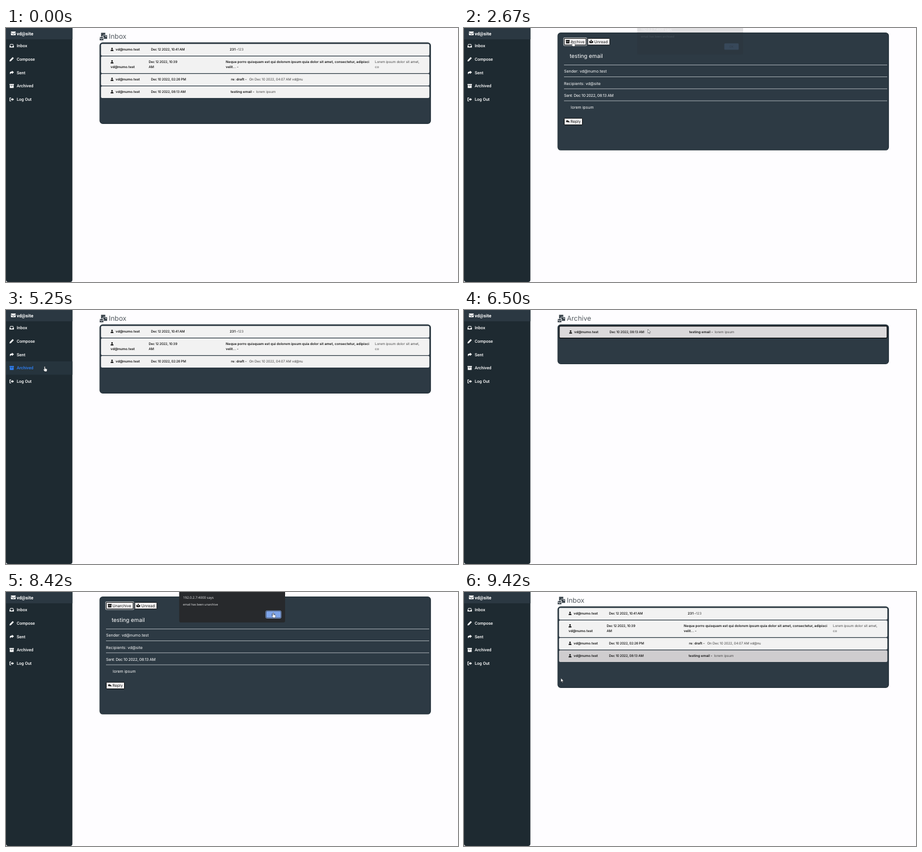
Write an HTML page that moves like this. It is 800 by 450 pixels and loops after 9510 ms.

```html
<!DOCTYPE html>
<html lang="en">
<head>
<meta charset="utf-8">
<title>Mailbox</title>
<style>
  html, body { margin: 0; width: 100%; height: 100%; overflow: hidden; background: #fefdff; }
  svg { display: block; width: 100vw; height: 100vh; }
  text { font-family: Inter, sans-serif; font-size: 6px; fill: #111; white-space: pre; text-rendering: geometricPrecision; }
  .side { font: 500 7.5px Roboto, sans-serif; fill: #fff; }
  .account { font: 700 8.1px Roboto, sans-serif; fill: #fff; }
  .on { fill: #2f80f5; }
  .heading { font-size: 12px; fill: #50575d; }
  .bold { font-weight: 600; letter-spacing: .04px; }
  .date { font-weight: 500; letter-spacing: -.24px; }
  .body { fill: #444; }
  .title { font-size: 9.8px; fill: #fff; }
  .field { font-size: 7px; fill: #fff; }
  .stamp { letter-spacing: -.3px; }
  .button { font-size: 6.9px; }
  .host { font: 6px "Open Sans", sans-serif; fill: #e6e7e9; }
  .note { font: 5.2px "Open Sans", sans-serif; fill: #f3f4f5; }
  .ok { font: 5.2px "Open Sans", sans-serif; fill: #2a3950; text-anchor: middle; }
</style>
</head>
<body>
<svg id="stage" viewBox="0 0 800 450"></svg>
<script>
const LOOP = 9510, STEP = 1000 / 12, LAST = 113;
const USER = "vd@site", SENDER = "vd@numo.test", HOST = "192.0.2.7:4000";

// Icons on a 16 unit grid
const ICONS = {
  mail: "M1 2h14l1 1v1.6l-8 5.6-8-5.6V3zM0 6.4l8 5.6 8-5.6V13l-1 1H1l-1-1z",
  inbox: "M3 2h10l3 7v5H0V9zM4.2 4L2 9h3l1.2 2.2h3.6L11 9h3l-2.2-5z",
  pen: "M11.5.5l4 4L5 15l-5 1 1-5z",
  share: "M9 1l7 6-7 6V9.5Q2.5 9.5 3 15-3 4.5 9 4.5z",
  reply: "M7 1L0 7l7 6V9.5q6.500 0 6 5.500 6-10.500-6-10.500z",
  box: "M0 1h16v4H0zM1 6h14v9H1zM5.500 7.500v1.500h5V7.500z",
  exit: "M6 1.500v2H2.200v9H6v2H1l-1-1v-11l1-1zM10 3l6 5-6 5v-3H5V6h5z",
  user: "M8 0a4 4 0 0 1 0 8 4 4 0 0 1 0-8zM1 16v-2q0-5 5-5h4q5 0 5 5v2z",
  stack: "M3 0h9v4H8L6 6v2H3zM0 9h8v1l-4 2.500L0 10zM0 11.200l4 2.500 4-2.500V16H0zM7 5h9v8H9V8H7zM12.500 6.500v2H14.500v-2z",
  reader: "M0 5q4 0 7.500 2v8Q4 13 0 13zM16 5q-4 0-7.500 2v8q3.500-2 7.500-2zM8 0a2.500 2.500 0 0 1 0 5.200 2.500 2.500 0 0 1 0-5.200z"
};
const MENU = [["inbox", "Inbox"], ["pen", "Compose"], ["share", "Sent"], ["box", "Archived"], ["exit", "Log Out"]];

const MAILS = [
  { date: ["Dec 12 2022, 10:41 AM"], subject: ["231 -"], sx: 396, body: ["123"], bx: 410.6 },
  { date: ["Dec 12 2022, 10:39", "AM"], body: ["Lorem ipsum dolor sit amet,", "co"], sx: 389, bx: 653, wrap: true,
    subject: ["Neque porro quisquam est qui dolorem ipsum quia dolor sit amet, consectetur, adipisci", "velit... -"] },
  { date: ["Dec 10 2022, 02:26 PM"], subject: ["re: draft -"], sx: 398.3, body: ["On Dec 10 2022, 04:07 AM vd@nu"], bx: 430.5, tight: true },
  { date: ["Dec 10 2022, 08:13 AM"], subject: ["testing email -"], sx: 397.5, body: ["lorem ipsum"], bx: 442.6 }
];

// Pages by starting step
const PAGES = [
  { at: 0, head: "Inbox", mails: MAILS },
  { at: 14, action: "Archive", wide: 39.5, focus: 30 },
  { at: 47, head: "Inbox", mails: MAILS.slice(0, 3) },
  { at: 72, head: "Archive", mails: MAILS.slice(3) },
  { at: 81, action: "Unarchive", wide: 48.5, focus: 89 },
  { at: 103, head: "Inbox", mails: MAILS }
];
const DIALOGS = [
  { open: 32, close: 47, note: "email has been archived" },
  { open: 91, close: 103, note: "email has been unarchive" }
];
// Pointer tip: step, x, y
const PATH = [
  [1, 346, 281], [9, 340, 115], [19, 340, 115], [29, 192.500, 23.500], [34, 192.500, 23.500], [42, 480, 38],
  [48, 480, 38], [55, 172, 86], [61, 68.500, 100], [71, 68.500, 100], [78, 325.500, 34], [82, 326, 36],
  [88, 198, 23], [92, 198, 23], [99, 473, 36.500], [104, 473, 36.500], [109, 330, 106], [112, 205, 118], [113, 171.500, 152.500]
];

const text = (cls, x, y, str) => `<text class="${cls}" x="${x}" y="${y}">${str}</text>`;
const rect = (x, y, w, h, fill, r = 0, extra = "") =>
  `<rect x="${x}" y="${y}" width="${w}" height="${h}" rx="${r}" fill="${fill}" ${extra}/>`;
const icon = (name, x, y, size, fill = "#111") =>
  `<path transform="translate(${x} ${y}) scale(${size / 16})" d="${ICONS[name]}" fill="${fill}" fill-rule="evenodd"/>`;
const inside = (p, x, y, w, h) => p.x >= x && p.x < x + w && p.y >= y && p.y < y + h;
const mix = (a, b, k) => a + (b - a) * k;

const pageAt = i => PAGES.filter(p => p.at <= i).pop();

function pointer(i) {
  const n = PATH.findIndex(p => p[0] >= i);
  if (n < 1) return { x: PATH[0][1], y: PATH[0][2] };
  const [a, b] = [PATH[n - 1], PATH[n]];
  const k = (i - a[0]) / (b[0] - a[0]), e = k * k * (3 - 2 * k);
  return { x: mix(a[1], b[1], e), y: mix(a[2], b[2], e) };
}

function menuHit(i) {
  const p = pointer(i);
  return p.x < 117 ? Math.floor((p.y - 19.700) / 23.750) : -1;
}

function rowHit(i, page) {
  if (i < 1 || pageAt(i) !== page) return -1;
  const p = pointer(i);
  let y = 28;
  return page.mails.findIndex(m => {
    const h = m.wrap ? 31 : 22, hit = inside(p, 168, y, 581.500, h);
    y += h;
    return hit;
  });
}

function sidebar(i) {
  const hit = menuHit(i);
  let out = rect(0, -6, 117.500, 456, "#1e2a31", 4) + rect(0, 0, 117.500, 20, "#2b3842");
  out += icon("mail", 8.700, 5.200, 8.500, "#fff") + text("account", 19, 12.600, USER);
  MENU.forEach(([name, label], n) => {
    const y = 31.600 + n * 23.750, on = n === hit;
    if (on) out += rect(0, y - 11.900, 117.500, 23.750, "#26343d");
    out += icon(name, 6.200, y - 4, 7.800, on ? "#2f80f5" : "#fff") + text(on ? "side on" : "side", 19, y + 2.500, label);
  });
  return out;
}

const panel = (y, bottom) =>
  rect(166.200, y + .700, 585.200, bottom - y - 1.400, "#2d3a44", 5, 'stroke="#27343d" stroke-width="1.400"');

function row(m, y, hover, shade) {
  const h = (m.wrap ? 31 : 22) - 1.200, tone = k => Math.round(mix(242, k, shade));
  const fill = `rgb(${tone(207)},${tone(205)},${tone(207)})`;
  const lines = (cls, x, list) => list.map((s, n) => text(cls, x, y + 12 + n * 9, s)).join("");
  const content = icon("user", 184.800, y + 6.900, 5.800)
    + text("bold", m.wrap ? 185 : 194, y + (m.wrap ? 21 : 12), SENDER)
    + lines("date", m.wrap ? 252.500 : 256.500, m.date)
    + lines("bold", m.sx, m.subject) + lines(m.tight ? "body\" letter-spacing=\"-.1" : "body", m.bx, m.body);
  return hover
    ? rect(168.700, y + .700, 580.100, h + .200, fill, 2, 'stroke="#050708" stroke-width="1.200"') + `<g transform="translate(1 1)">${content}</g>`
    : rect(168.200, y + .200, 581.100, h, fill, 2) + content;
}

function list(i, page) {
  const hit = rowHit(i, page);
  let y = 28, rows = "";
  page.mails.forEach((m, n) => {
    const shade = [1, 2, 3].filter(k => rowHit(i - k, page) === n).length / 3;
    rows += row(m, y, n === hit, shade);
    y += (m.wrap ? 31 : 22) + (n === hit ? 1 : 0);
  });
  return icon("stack", 165.800, 8.600, 13.200, "#39434b") + text("heading", 182, 19, page.head) + panel(25.500, y + 45) + rows;
}

function button(x, y, w, name, label, lx, focus) {
  const ring = focus ? rect(x - .600, y - .600, w + 1.200, 13.700, "none", 1, 'stroke="#fff" stroke-width=".8"') : "";
  return ring + rect(x + .500, y + .500, w - 1, 11.500, "#f6f5f6", .500, 'stroke="#050708" stroke-width="1"')
    + icon(name, x + 3.200, y + 2.800, 6.800) + text("button", lx, y + 8.500, label);
}

function detail(i, page) {
  const ux = 177 + page.wide + 2;
  let out = panel(8, 216.800);
  out += button(177, 18, page.wide, "box", page.action, 188.500, i >= page.focus);
  out += button(ux, 18, 40, "reader", "Unread", ux + 12, false);
  out += text("title", 187, 52.800, "testing email");
  for (let n = 0; n < 4; n++) out += rect(177, 65 + n * 21.200, 572, .800, "#c5cbcf");
  out += text("field", 177, 79.300, "Sender: " + SENDER) + text("field", 177, 100.500, "Recipients: " + USER);
  out += text("field stamp", 177, 121.700, "Sent: Dec 10 2022, 08:13 AM") + text("field", 189, 142.900, "lorem ipsum");
  return out + button(177, 159.500, 33, "reply", "Reply", 188.500, false);
}

function dialogAt(i) {
  const d = DIALOGS.find(d => i >= d.open && i < d.close + 3);
  if (!d) return null;
  const closing = i >= d.close, n = closing ? i - d.close : i - d.open;
  const alpha = closing ? [.84, .45, .12][n] : [.13, .5, .85][n] ?? 1;
  const dy = closing ? -3 - 2 * n : [-7, -4, -1.500][n] ?? 0;
  return { ...d, alpha, dy };
}

function dialog(d) {
  if (!d) return "";
  const ring = d.alpha === 1 ? rect(459.700, 33.300, 27.300, 13.200, "none", 2, 'stroke="#8db4f5" stroke-width=".8"') : "";
  return `<g opacity="${d.alpha}" transform="translate(0 ${d.dy})">`
    + rect(306.500, -12, 187.500, 66, "#27292c", 3) + text("host", 313.300, 12.300, HOST + " says")
    + text("note", 313.300, 24, d.note) + ring + rect(460.700, 34.200, 25.400, 11.400, "#7fa5ea", 1.500)
    + text("ok", 473.300, 41.800, "OK") + "</g>";
}

function cursor(i, page, d) {
  if (i < 1) return "";
  const p = pointer(i);
  const overOk = d && d.alpha === 1 && inside(p, 460, 33, 27, 14);
  const overButton = page.action && !overOk && inside(p, 177, 18, page.wide, 13);
  const hand = overOk || overButton || menuHit(i) >= 0;
  const shape = hand
    ? "M-.8.6q.8-1.200 1.600 0v3l2.800.8q.9.300.7 1.400l-.7 3.200H0l-2.500-3.200q0-1 .9-.8l.8.700z"
    : "M0 0v7l1.600-1.500 1.100 2.500 1-.450-1.100-2.400h2.200z";
  return `<path transform="translate(${p.x} ${p.y})" d="${shape}" fill="#fff" stroke="#23262a" stroke-width=".5"/>`;
}

const stage = document.getElementById("stage"), start = performance.now();
let shown = -1;

function draw() {
  const t = (performance.now() - start) % LOOP;
  const i = Math.min(LAST, Math.floor((t + 5) / STEP));
  if (i !== shown) {
    const page = pageAt(i), d = dialogAt(i);
    stage.innerHTML = sidebar(i) + (page.mails ? list(i, page) : detail(i, page)) + dialog(d) + cursor(i, page, d);
    shown = i;
  }
  requestAnimationFrame(draw);
}
draw();
</script>
</body>
</html>
```
